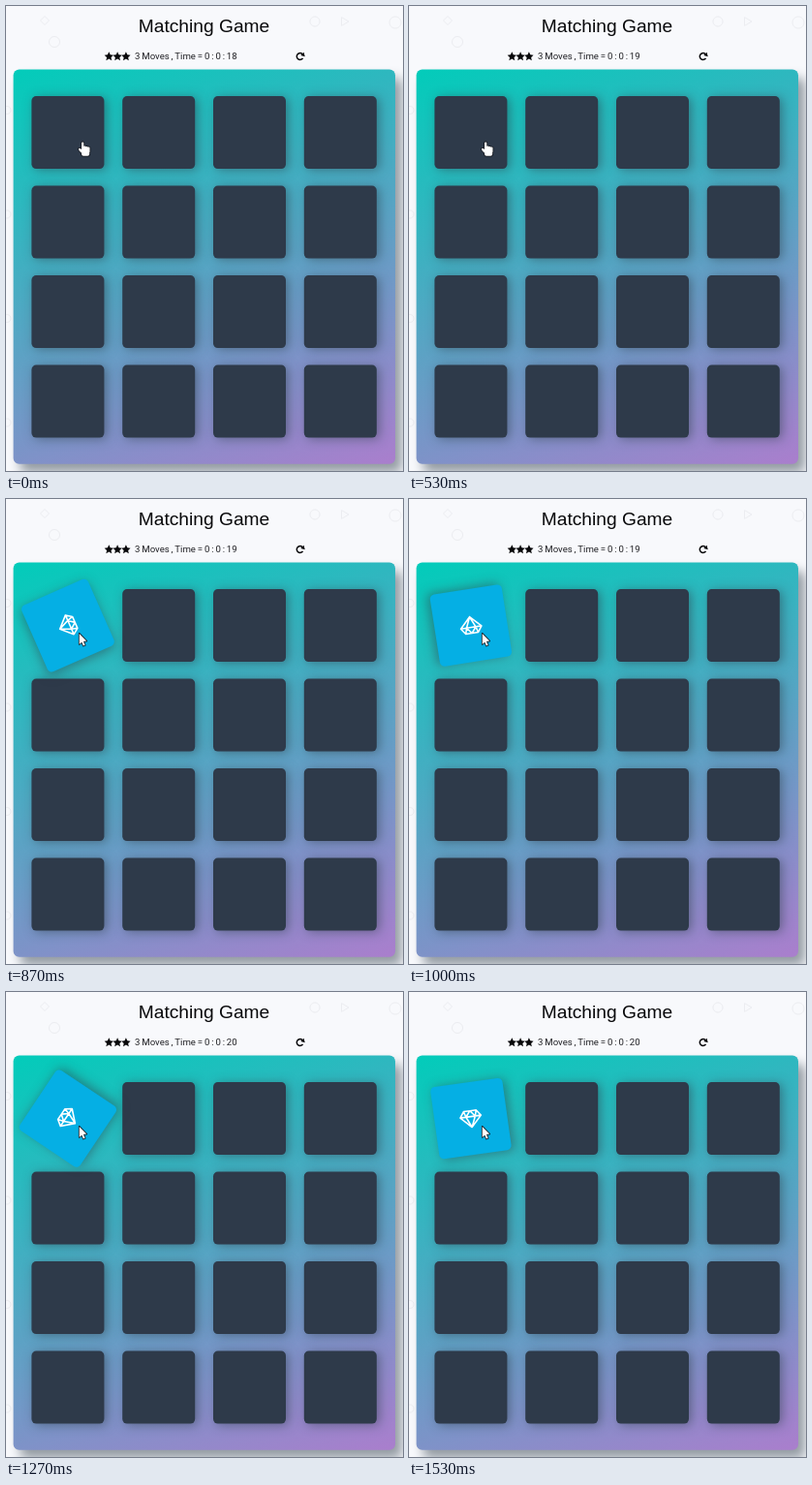
An HTML page with a canvas that plays this animation: 410 by 480 pixels, repeating every 1590 ms.

```html
<!DOCTYPE html>
<html lang="en">
<head>
<meta charset="utf-8">
<title>Matching Game</title>
<style>
  html, body { margin: 0; width: 100%; height: 100%; overflow: hidden; background: #f8f9fc; }
  canvas { display: block; }
</style>
</head>
<body>
<canvas id="stage" width="410" height="480"></canvas>
<script>
const ctx = document.getElementById('stage').getContext('2d');
const TAU = Math.PI * 2;
const LOOP = 1590, STEP = 200 / 3;
const OPEN_AT = 716, SPIN = 1010, TICK_AT = 195;
const CARD = 75, PITCH_X = 93.8, PITCH_Y = 92.5;
const PANEL = { x: 7.6, y: 65.4, w: 394.4, h: 407.4 };

// CSS "ease" curve: cubic-bezier(.25, .1, .25, 1)
function ease(x) {
  const bezier = (s, a, b) => 3 * a * s * (1 - s) ** 2 + 3 * b * s * s * (1 - s) + s ** 3;
  let lo = 0, hi = 1;
  for (let i = 0; i < 30; i++) {
    const mid = (lo + hi) / 2;
    if (bezier(mid, 0.25, 0.25) < x) lo = mid; else hi = mid;
  }
  return bezier(lo, 0.1, 1);
}

// Runs a drawing in its own coordinate system
function at(x, y, angle, paint) {
  ctx.save();
  ctx.translate(x, y);
  ctx.rotate(angle);
  paint();
  ctx.restore();
}

// Regular polygon; with inner < 1 every second corner is pulled in
function polygon(x, y, r, corners, turn = 0, inner = 1) {
  ctx.beginPath();
  for (let i = 0; i < corners; i++) {
    const a = turn + i * TAU / corners, d = i % 2 ? r * inner : r;
    ctx.lineTo(x + d * Math.cos(a), y + d * Math.sin(a));
  }
  ctx.closePath();
}

function shadowBox(x, y, w, h, radius, fill, dx, dy, blur) {
  ctx.save();
  ctx.shadowColor = 'rgba(46,61,73,0.5)';
  ctx.shadowOffsetX = dx;
  ctx.shadowOffsetY = dy;
  ctx.shadowBlur = blur;
  ctx.fillStyle = fill;
  ctx.beginPath();
  ctx.roundRect(x, y, w, h, radius);
  ctx.fill();
  ctx.restore();
}

function drawBackdrop() {
  ctx.fillStyle = '#f8f9fc';
  ctx.fillRect(0, 0, 410, 480);
  ctx.strokeStyle = '#ecedf1';
  ctx.lineWidth = 1;
  const outline = (...shape) => { polygon(...shape); ctx.stroke(); };
  outline(50, 37, 5.5, 32);
  outline(319, 16, 5, 32);
  outline(402, 17, 6, 32);
  outline(349, 16, 5, 3);
  outline(40, 15, 4.5, 4);
  for (let i = 1; i < 5; i++) outline(1, i * 107.5, 4, 32);
}

function drawHeader(seconds) {
  ctx.fillStyle = '#08080a';
  ctx.textAlign = 'center';
  ctx.font = '19.2px "Liberation Sans", Arial, sans-serif';
  ctx.fillText('Matching Game', 204.5, 27.4);

  for (let i = 0; i < 3; i++) {
    polygon(106.3 + i * 8.8, 52.2, 4.9, 10, -TAU / 4, 0.48);
    ctx.fill();
  }

  // reload arrow
  ctx.strokeStyle = ctx.fillStyle;
  ctx.lineWidth = 1.5;
  ctx.beginPath();
  ctx.arc(303.7, 52, 3.4, 0.6, TAU - 0.75);
  ctx.stroke();
  polygon(306.9, 50.3, 2.6, 3, TAU / 8);
  ctx.fill();

  ctx.fillStyle = '#202024';
  ctx.textAlign = 'left';
  ctx.font = '9.6px Roboto, sans-serif';
  ctx.wordSpacing = '-0.5px';
  ctx.fillText(`3 Moves , Time = 0 : 0 : ${seconds}`, 133, 55.4);
  ctx.wordSpacing = '0px';
}

function drawPanel() {
  const { x, y, w, h } = PANEL;
  const angle = 160 * TAU / 360, sin = Math.sin(angle), cos = Math.cos(angle);
  const half = (w * Math.abs(sin) + h * Math.abs(cos)) / 2;
  const cx = x + w / 2, cy = y + h / 2;
  const grad = ctx.createLinearGradient(
    cx - sin * half, cy + cos * half, cx + sin * half, cy - cos * half);
  grad.addColorStop(0, '#02ccba');
  grad.addColorStop(1, '#aa7ecd');
  shadowBox(x, y, w, h, 6, grad, 7, 9, 12);
}

// The shadow offset turns together with the card
function drawCard(angle, fill) {
  const c = Math.cos(angle), s = Math.sin(angle);
  shadowBox(-CARD / 2, -CARD / 2, CARD, CARD, 4.8, fill, 3 * c - 1.5 * s, 3 * s + 1.5 * c, 11);
}

function drawDiamond() {
  const wide = 10.8, top = 6.5, inner = 4.8, crown = -8, girdle = -2, tip = 9;
  ctx.strokeStyle = '#fff';
  ctx.lineWidth = 1.6;
  ctx.lineJoin = 'round';
  ctx.beginPath();
  for (const side of [-1, 1]) {
    ctx.moveTo(0, crown);
    ctx.lineTo(side * top, crown);
    ctx.lineTo(side * wide, girdle);
    ctx.lineTo(0, tip);
    ctx.lineTo(side * inner, girdle);
    ctx.lineTo(0, crown);
    ctx.moveTo(side * top, crown);
    ctx.lineTo(side * inner, girdle);
    ctx.moveTo(0, girdle);
    ctx.lineTo(side * wide, girdle);
  }
  ctx.stroke();
}

function outlined(path) {
  ctx.lineJoin = 'round';
  ctx.lineWidth = 1.6;
  ctx.strokeStyle = '#15181f';
  ctx.fillStyle = '#fff';
  ctx.stroke(path);
  ctx.fill(path);
}

function drawArrow() {
  const size = 11, path = new Path2D();
  path.lineTo(0, 0);
  path.lineTo(0, size);
  path.lineTo(size * 0.23, size * 0.8);
  path.lineTo(size * 0.38, size * 1.15);
  path.lineTo(size * 0.54, size * 1.08);
  path.lineTo(size * 0.39, size * 0.74);
  path.lineTo(size * 0.68, size * 0.7);
  path.closePath();
  outlined(path);
}

// Index finger, three knuckles, palm and thumb
function drawHand() {
  const path = new Path2D();
  path.roundRect(-1, 0, 2.3, 11, 1.1);
  for (let i = 1; i < 4; i++) path.roundRect(i * 2 - 1, 3.6 + i * 0.5, 2.5, 6, 1.1);
  path.roundRect(-1, 7, 8.2, 7.4, 2);
  path.ellipse(-1.6, 9, 1.3, 3.2, -0.7, 0, TAU);
  outlined(path);
}

function draw(t) {
  const open = t >= OPEN_AT;
  drawBackdrop();
  drawPanel();
  drawHeader(18 + Math.floor((t - TICK_AT) / 1000 + 1));

  // last to first, so the open card lies on top
  for (let i = 15; i >= 0; i--) {
    const lit = open && i === 0;
    const angle = lit ? ease((t - OPEN_AT) / SPIN) * TAU : 0;
    at(63.9 + (i % 4) * PITCH_X, 130.6 + Math.floor(i / 4) * PITCH_Y, angle, () => {
      drawCard(angle, lit ? '#05afe4' : '#2e3a4a');
      if (lit) drawDiamond();
    });
  }
  if (open) at(75.7, 138.9, 0, drawArrow);
  else at(79, 140.4, 0, drawHand);
}

const start = performance.now();
function tick() {
  const t = (performance.now() - start) % LOOP;
  draw(Math.floor((t + 4) / STEP) * STEP);
  requestAnimationFrame(tick);
}
tick();
</script>
</body>
</html>
```
